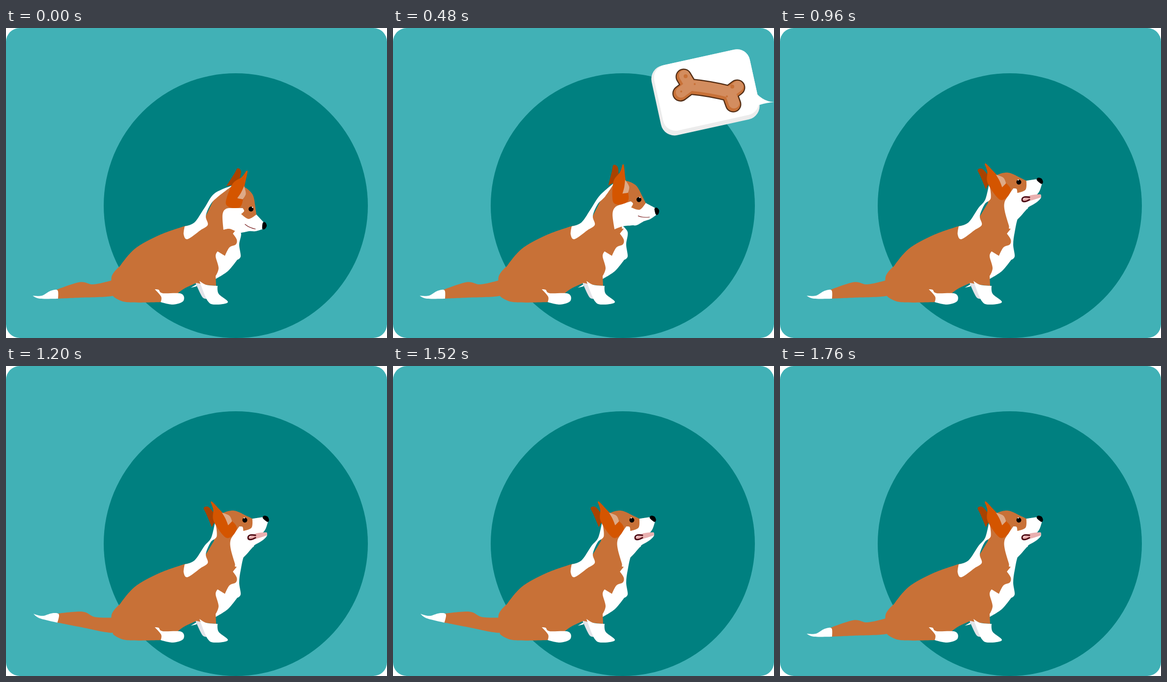
Animation of 776 by 630 pixels, one loop 2640 ms. Source, as an HTML page:

```html
<!DOCTYPE html>
<html lang="en">
<head>
<meta charset="utf-8">
<title>Dog and treat</title>
<style>
  html, body { margin: 0; width: 100%; height: 100%; overflow: hidden; background: #fff; }
  svg { display: block; width: 776px; height: 630px; }
</style>
</head>
<body>
<svg id="stage" viewBox="0 0 776 630"></svg>
<script>
const LOOP = 2640, STEP = 80;
const LIFT = -55.5, WAG = 13.6;
const PIVOT = { x: 440.6, y: 352.5 };
const BROWN = '#c87137', WHITE = '#fff', BLACK = '#000';
const stage = document.getElementById('stage');
const posed = [];

function add(parent, tag, attrs = {}) {
  const el = document.createElementNS('http://www.w3.org/2000/svg', tag);
  for (const key in attrs) el.setAttribute(key, attrs[key]);
  return parent.appendChild(el);
}
const group = parent => add(parent, 'g');

function turn(x, y, degrees) {
  const a = degrees * Math.PI / 180, dx = x - PIVOT.x, dy = y - PIVOT.y;
  return {
    x: PIVOT.x + dx * Math.cos(a) - dy * Math.sin(a),
    y: PIVOT.y + dx * Math.sin(a) + dy * Math.cos(a)
  };
}

// Closed smooth curve through "x,y" points. "!" marks a sharp corner,
// "@s" lets the point follow the share s of the head's turn.
function curve(text, angle = 0) {
  const pts = text.split(' ').map(s => {
    const [place, share = 0] = s.replace('!', '').split('@');
    const [x, y] = place.split(',').map(Number);
    return { ...turn(x, y, angle * share), sharp: s.endsWith('!') };
  });
  const at = i => pts[(i + pts.length) % pts.length];
  const handle = (i, dir) => {
    const p = at(i), k = p.sharp ? 0 : dir / 6;
    return `${p.x + (at(i + 1).x - at(i - 1).x) * k} ${p.y + (at(i + 1).y - at(i - 1).y) * k}`;
  };
  return `M${pts[0].x} ${pts[0].y}` + pts.map((p, i) =>
    `C${handle(i, 1)} ${handle(i + 1, -1)} ${at(i + 1).x} ${at(i + 1).y}`).join('') + 'Z';
}

function shape(parent, fill, pts) {
  const el = add(parent, 'path', { d: curve(pts), fill });
  if (pts.includes('@')) posed.push({ el, pts });
  return el;
}
const line = (parent, stroke, width, d) => add(parent, 'path', {
  d, stroke, 'stroke-width': width, fill: 'none', 'stroke-linecap': 'round', 'stroke-linejoin': 'round'
});
const dot = (parent, fill, cx, cy, r) => add(parent, 'circle', { fill, cx, cy, r });

// Backdrop
add(stage, 'rect', { width: 776, height: 630, rx: 28, fill: '#41b1b6' });
dot(stage, '#008080', 468, 361, 269);

// Tail
const tail = group(stage);
shape(tail, BROWN, '100,533! 150,516.5 178,521 215,513! 235,530! 217,544.5 150,548 104,550!');
shape(tail, WHITE, '54.5,544! 73,544 91,534 105,533 106,550! 69,550');

// Body and legs
shape(stage, WHITE, '441,390! 465,412@1 455,405@.75 478,415 475,440 478,464 471,471! 452,494 427,510! 415,460!');
shape(stage, '#e3e3e8', '386,518! 395,513! 411,550! 400,547');
shape(stage, WHITE, '376,528! 388,521! 388,525!');
shape(stage, BROWN, '366,402! 312,421 262,449 232,484! 215,506 218,545! 245,557 317,557! 350,539! 364,529 388,518! 408,522 428,524! 427,504! 433,488 427,464 431,454! 446,463! 455,446 468,440 470,430 462,418! 470,408! 400,400!');
shape(stage, WHITE, '303,531! 311,532 319,539 357,540 361,555 340,562 315,557! 316,546');
shape(stage, WHITE, '394,514! 408,522 431,524! 433,540 452,557 428,562 411,555');

// Neck
const backEar = group(stage);
shape(backEar, '#a84300', '449,321! 465,296 472,285 479,293 472,318!');
shape(stage, BROWN, '404,388! 425,345@.65! 463,320@1! 485,345@1! 465,372@.7! 466,410! 462,418! 400,420!');
shape(stage, WHITE, '364,403! 384,395 404,366 425,336@.65 463,319.5@1! 434,341@.5 417,358 407,382 411,400 396,411 370,429 362,420');

// Head
const head = group(stage);
const crown = group(head);
shape(crown, BROWN, '458,329! 463,320! 485,323 502,338 507,358! 510,379! 495,396! 441,382! 441,350!');
shape(head, WHITE, '482,366@1! 485,372@1 479,378@1! 494,388@1 510,379@1! 525,395@1! 529,402@1! 522,409@1! 508,413@1 495,413@1 478,416@1 468,413@1 455,408@.75 443,410@.45! 441,380@.7 448,367.5@1 465,366@1');

const smile = group(head);
line(smile, '#7a2020', 1.2, 'M487 399Q495 406 508 408.5');

const mouth = group(head);
shape(mouth, WHITE, '497,343! 531,338! 531,346 520,356 500,367!');
shape(mouth, '#e9afaf', '494,349! 510,340 531,338! 532,344! 513,350 497,353');
line(mouth, '#500d16', 3, 'M508 344C496 342 493 345 493 349S498 355 508 349');

const features = group(head);
shape(features, BLACK, '523,396 528,395 531,402 527,408.5 522,408');
dot(features, BLACK, 499, 368, 5);
dot(features, WHITE, 502, 364.5, 1.2);
shape(features, '#d45500', '488.5,291.5! 492,292 486,321 480,359 466,366 450,361 449,347 462,316 480,303');
shape(features, '#deaa87', '485,321! 488.5,337 482,348! 471,346! 479,334');

// Speech bubble
const bubble = group(stage);
const card = add(bubble, 'g', { transform: 'translate(636.4 131) rotate(-12.4)' });
add(card, 'rect', { x: -102.5, y: -72.5, width: 205, height: 145, rx: 28, fill: '#ececec' });
add(card, 'rect', { x: -96.5, y: -72.5, width: 199, height: 136, rx: 26, fill: WHITE });
add(bubble, 'path', { d: 'M738 125L741 134Q757 150 776 150.5Q760 152 744 157Z', fill: WHITE });

// Bone: one branching stroke, laid down in narrowing layers
const BONE = 'M592 99L604 119L585.5 133M604 119Q646 123 685 133M701 121L685 133L693 155';
line(bubble, '#502d16', 33, BONE);
line(bubble, BROWN, 28.5, BONE);
line(bubble, '#d38d5f', 22, BONE).setAttribute('transform', 'translate(1.5 -2.5)');
dot(bubble, BROWN, 596, 98, 4);
dot(bubble, BROWN, 691, 119, 4);
[[614.5, 114], [680, 139], [587, 129]].forEach(([x, y]) => dot(bubble, BROWN, x, y, 2));

const show = (el, on) => el.setAttribute('visibility', on ? 'visible' : 'hidden');
const between = (t, from, to) => t >= from && t < to;

function draw(t) {
  // The head lifts in three equal steps.
  const lift = Math.max(0, Math.min(3, Math.floor((t - 480) / STEP) + 1)) / 3;
  const angle = LIFT * lift;
  const spin = `rotate(${angle} ${PIVOT.x} ${PIVOT.y})`;
  [backEar, crown, features, smile].forEach(g => g.setAttribute('transform', spin));
  posed.forEach(({ el, pts }) => el.setAttribute('d', curve(pts, angle)));
  head.setAttribute('transform', `translate(${between(t, 240, 480) ? 1 : 0} 0)`);
  show(smile, lift < 1);
  show(mouth, lift === 1);
  show(bubble, between(t, 240, 960));

  const up = between(t, 1200, 1760) && Math.floor((t - 1200) / STEP) % 2 === 0;
  tail.setAttribute('transform', `rotate(${up ? WAG : 0} 225 530)`);
}

function tick() {
  draw(performance.now() % LOOP);
  requestAnimationFrame(tick);
}
tick();
</script>
</body>
</html>
```
